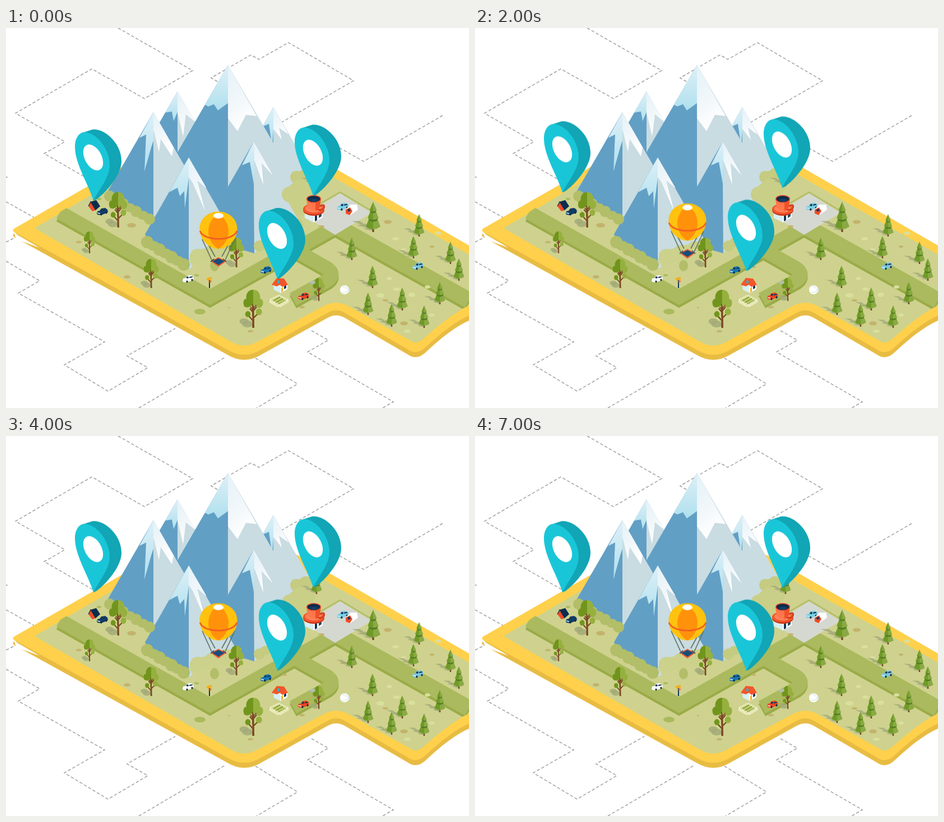
An HTML page for the animation above (8000 ms loop, 826x678 px).

```html
<!DOCTYPE html>
<html lang="en">
<head>
<meta charset="utf-8">
<title>Isometric map</title>
<style>
html, body { margin: 0; width: 100%; height: 100%; overflow: hidden; background: #fff; }
svg { display: block; width: 100%; height: 100%; }
.lift { will-change: transform; }
</style>
</head>
<body>
<svg id="stage" viewBox="0 0 826 678">
  <defs>
    <linearGradient id="iceL" x1="0" y1="0" x2="0" y2="1"><stop offset="0" stop-color="#dff0f7"/><stop offset="1" stop-color="#aee0ee"/></linearGradient>
    <linearGradient id="iceR" x1="0" y1="0" x2=".3" y2="1"><stop offset="0" stop-color="#e3f2f8"/><stop offset=".6" stop-color="#f2f7fa"/><stop offset="1" stop-color="#fff"/></linearGradient>
    <g id="tree">
      <path d="M-2.5 0L-2 -62H2L3 0Z" fill="#7a4a23"/>
      <path d="M0 -18L-14 -34M0 -25L15 -40M0 -40L-9 -51M0 -44L9 -55" stroke="#7a4a23" stroke-width="3.4" fill="none"/>
      <path d="M0 -100C-13 -101 -20 -88 -18 -76C-26 -77 -28 -64 -23 -56C-17 -52 -10 -53 -7 -58L0 -57Z" fill="#71951c"/>
      <path d="M0 -100C13 -101 20 -88 18 -76C26 -77 29 -62 22 -55C16 -50 9 -53 7 -60L0 -57Z" fill="#96b03f"/>
      <ellipse cx="-14" cy="-36" rx="7" ry="8" fill="#71951c"/>
      <ellipse cx="15" cy="-42" rx="8" ry="9" fill="#96b03f"/>
      <path d="M-1.5 -30V-62M0 -45L-7 -56M0 -50L8 -60" stroke="#7a4a23" stroke-width="2.6"/>
    </g>
    <g id="pine">
      <path d="M-4 -4L-30 -10L-22 -14L-52 -22L-40 -25L-70 -36L-44 -36L-30 -27L-24 -28L-8 -14L0 -12Z" fill="#a3aa79" opacity=".85"/>
      <path d="M-3 0V-14H3V0Z" fill="#75471f"/>
      <path d="M0 -100L-12 -72L-8 -72L-18 -46L-13 -46L-24 -18Q-12 -9 0 -9Z" fill="#6f9a27"/>
      <path d="M0 -100L12 -72L8 -72L18 -46L13 -46L24 -18Q12 -9 0 -9Z" fill="#8aa944"/>
      <path d="M-12 -72Q0 -63 12 -72L8 -72L10 -66Q0 -58 -10 -66L-8 -72ZM-18 -46Q0 -35 18 -46L13 -46L15 -39Q0 -29 -15 -39L-13 -46Z" fill="#557f22"/>
    </g>
    <g id="car">
      <path d="M-10 3L-9 -1L-5 -2L-2 -6L5 -7L9 -4L10 0L8 2L-3 6L-9 5Z"/>
      <path d="M-4 -2L-2 -5L1 -4L0 -1ZM2 -2L2 -4L7 -5L8 -3Z" fill="#12365a"/>
      <path d="M-9 2L-4 3" stroke="#dff5fa" stroke-width="1.3"/>
      <ellipse cx="-2" cy="4.6" rx="1.5" ry="2" fill="#17283c"/>
      <ellipse cx="7" cy="1.6" rx="1.5" ry="2" fill="#17283c"/>
    </g>
    <g id="pin">
      <path d="M-20 -121L-3 -126.500C17 -131 50 -104 50 -70C50 -46 22 -14 5 -2L0 0Z" fill="#11a5b5"/>
      <path d="M0 0C-7 -26 -33 -65 -33 -96C-33 -111 -26 -122 -16 -122C5 -122 29 -92 29 -64C29 -41 11 -22 0 0Z" fill="#19c6d8"/>
      <ellipse cx="-.5" cy="-77" rx="15" ry="25" transform="rotate(-28 -.5 -77)" fill="#fff"/>
    </g>
  </defs>
</svg>
<script>
const stage = document.getElementById('stage');
const out = [];
const path = (d, fill, extra = '') => out.push(`<path d="${d}" fill="${fill}" ${extra}/>`);
const poly = (pts, fill) => out.push(`<polygon points="${pts}" fill="${fill}"/>`);
const oval = (x, y, rx, ry, fill, extra = '') =>
  out.push(`<ellipse cx="${x}" cy="${y}" rx="${rx}" ry="${ry}" fill="${fill}" ${extra}/>`);
const line = (d, color, width, extra = '') =>
  path(d, 'none', `stroke="${color}" stroke-width="${width}" ${extra}`);
const use = (id, x, y, scale = 1, extra = '') =>
  out.push(`<use href="#${id}" transform="translate(${x} ${y}) scale(${scale})" ${extra}/>`);

// dashed outlines on the white floor
[
  'M200 0L333 76L247 126L153 73L17 152L105 203L68 224L155 274',
  'M385 100L366 89L437 48L451 56L504 26L620 94L480 175',
  'M779 156L638 238L588 210',
  'M0 265L3 267', 'M0 310L50 338', 'M0 382L22 371',
  'M0 416L60 451L22 473L176 560L104 601L182 648L253 606L216 585L302 536',
  'M237 678L392 587', 'M445 589L520 635L447 678',
  'M545 540L575 557L538 578L691 667L672 678'
].forEach(d => line(d, '#a3a3a3', 1.5, 'stroke-dasharray="5.5 3.500"'));

// board
const rim = 'M16 357L213 244L520 212L826 388V513C796 527 772 548 746 572Q731 584 716 573L606 509Q590 499 574 508L455 574Q425 592 395 574L18 366Q8 361 16 357Z';
path(rim, '#e8bc43', 'transform="translate(0 9)"');
path('M13 360L18 377L60 392Z', '#fff');
path('M13 361L20 369L60 392L60 380Z', '#e8bc43');
path(rim, '#ffd04b');
path('M51 357L213 262L545 244L826 404V495C796 510 770 532 744 555Q731 566 720 557L609 495Q588 485 567 496L450 559Q425 574 400 559Z', '#ced28e');

// roads, with a darker kerb just below
const roads = [
  ['M96 329L364 480L592 352', 25],
  ['M574 345L826 486', 29],
  ['M510 393L572 428Q590 440 572 451L512 484', 25]
];
out.push('<clipPath id="land"><path d="M51 357L300 200H560L826 404V495L790 513L590 490L425 572Z"/></clipPath><g clip-path="url(#land)">');
roads.forEach(([d, w]) => line(d, '#9bab48', w, 'transform="translate(0 5)"'));
roads.forEach(([d, w]) => line(d, '#abba5e', w));
out.push('</g>');

// car park
poly('532,335 596,295 652,330 587,369', '#d5d8d0');
line('M540 325L596 293L650 325', '#b1bd67', 2.5);
oval(527, 325, 9, 8, '#a3aa79');

// stones and pale patches
[[224,352,8,4],[130,382,5,2],[216,444,6,3],[436,541,5,2],[681,346,7,3.5],[563,354,5,2],[710,527,7,3.5],[528,498,5,2],[601,404,5,2],[677,486,5,2],[760,390,4,2],[497,426,4,2]]
  .forEach(p => oval(...p, '#c3b36c'));
[[684,447,5,3],[697,466,6,3],[724,476,6,4],[668,477,7,4],[752,462,5,3],[709,396,5,3],[695,376,6,3],[771,366,6,3],[760,512,5,3],[716,541,6,3]]
  .forEach(p => oval(...p, '#d9df9c'));
[[346,506,10,5],[340,441,4,2],[398,499,2,1],[654,393,6,3],[166,305,4,2]].forEach(p => oval(...p, '#aaba5d'));

// mountains: left face, right face, left snow, right snow
const blue = '#629fc5', pale = '#c8dce2';
function mountain(left, right, snowL, snowR) {
  poly(left, blue);
  poly(right, pale);
  poly(snowL, 'url(#iceL)');
  poly(snowR, 'url(#iceR)');
}
mountain('306,113 250,210 306,250', '306,113 306,250 375,232',
  '306,113 284,151 296,149 299,166 306,150', '306,113 337,167 321,154 316,193 306,151');
mountain('477,141 445,198 477,260', '477,141 477,300 495,292 514,270 541,252',
  '477,141 457,176 469,171 475,211 477,182', '477,141 504,190 487,178 492,199 477,180');
mountain('396,66 300,232 340,360 396,390', '396,66 396,360 440,350 516,272',
  '396,66 355,137 361,140 371,136 378,147 396,134', '396,66 447,157 428,155 413,184 396,161');
mountain('263,150 180,294 200,310 263,344', '263,150 263,344 330,380 364,325',
  '263,150 238,196 250,190 247,256 259,213 263,201', '263,150 299,213 296,229 276,198 273,221 263,181');
mountain('442,203 384,304 384,385 443,402', '442,203 443,402 468,378 523,345',
  '442,203 421,245 435,239 442,278 443,236', '442,203 476,263 456,241 459,279 443,236');
mountain('326,231 248,368 258,388 326,430', '326,231 326,430 414,386',
  '326,231 291,293 306,285 310,300 318,291 319,322 326,268', '326,231 358,286 341,272 355,326 333,276 326,266');

// shrubs along the foot of the mountains
function hedge(x0, y0, x1, y1, r, n, color) {
  for (let i = 0; i <= n; i++) {
    const k = i / n;
    oval(x0 + (x1 - x0) * k, y0 + (y1 - y0) * k, r, r * (i % 2 ? .8 : 1), color);
  }
}
hedge(185, 300, 256, 341, 10, 6, '#b2be68');
hedge(252, 382, 317, 422, 11, 6, '#b2be68');
poly('326,412 345,398 420,378 420,410 340,440', '#ced28e');
hedge(342, 408, 405, 391, 14, 5, '#ccd18b');
hedge(452, 389, 520, 350, 10, 6, '#c5cb80');
oval(372, 424, 8, 10, '#b2be68');
hedge(518, 266, 543, 259, 11, 3, '#c5cb80');
hedge(506, 297, 528, 283, 14, 2, '#c9ce87');
poly('494,292 520,270 560,270 532,334 519,338', '#cacf88');

// trees: x, foot, height
const shadow = (x, y, s) => {
  oval(x - 15 * s, y - 10 * s, 14 * s, 9 * s, '#a3aa79', 'opacity=".85"');
  oval(x - 24 * s, y - 17 * s, 12 * s, 8 * s, '#a3aa79', 'opacity=".85"');
};
[[200,356,63],[149,402,39],[259,464,52],[411,427,53],[441,535,68],[558,487,41]].forEach(([x, y, h]) => {
  const s = h / 100;
  shadow(x, y, s);
  use('tree', x, y, s);
});
[[554,282,40],[655,364,54],[737,372,40],[727,411,40],[793,421,40],[808,451,40],[617,414,40],[654,464,40],[774,493,40],[707,504,41],[646,512,40],[688,533,41],[746,535,40]]
  .forEach(([x, y, h]) => use('pine', x, y, h / 100));

// cars
use('car', 172, 328, 1, 'fill="#123d66"');
use('car', 325, 448, 1, 'fill="#fff"');
use('car', 464, 432, 1, 'fill="#1b78b4"');
use('car', 531, 479, 1, 'fill="#ee4423"');
use('car', 735, 425, 1, 'fill="#7cc6db"');
use('car', 601, 319, 1.05, 'fill="#79cfe4"');
poly('606,323 615,315 626,315 628,324 614,334 606,331', '#fff');
poly('606,324 614,320 618,327 613,334 606,331', '#ee4d2a');
poly('609,324 613,322 615,326 610,328', '#17375a');

// tent
poly('147,318 151,310 160,325 154,327', '#ef4b27');
poly('151,310 161,307 168,318 160,325', '#0d2d4d');
line('M147 318L151 310L160 325', '#0d2d4d', 1.2);

// signpost
line('M363 445V464', '#17375a', 2);
path('M357 447L366 444L368 448L360 451Z', '#f7ae1b');
path('M360 453L367 450L366 454Z', '#e9682b');

// round white animal
oval(604, 467, 8, 8, '#fff');
oval(611, 468, 2, 4, '#e5edf0');
line('M600 462Q606 459 608 465M600 471Q605 474 609 469', '#ccd9dd', 1);
oval(547, 454, 5, 3, '#aebfae');

// cottage and garden
poly('477,457 483,452 490,460 490,473 478,467', '#d7f0f7');
poly('489,461 502,455 502,466 490,473', '#fff');
poly('474,458 483,446 496,447 503,458 493,462 489,458 483,461', '#f5552b');
poly('491,464 494,462 494,470 491,472', '#f8ae1c');
poly('496,461 500,459 500,464 496,466', '#14375b');
oval(486, 453, 2, 3, '#16b7cc');
poly('470,487 488,477 505,487 487,497', '#c5d078');
line('M477 487L489 480M481 490L494 483M485 493L499 486', '#879e38', 2);
line('M471 487L487 496L504 486', '#fffbe0', 6, 'stroke-dasharray="1.6 1.1"');
line('M471 485L487 477L504 486', '#fffbe0', 3, 'stroke-dasharray="1.5 1.5"');

// cafe under a giant cup
poly('533,326 549,331 549,347 533,339', '#d8eff5');
poly('549,331 565,326 565,338 549,347', '#fff');
poly('551,335 555,333 555,343 551,345', '#173553');
poly('558,332 563,329 563,336 558,339', '#2e4961');
oval(549, 325, 19, 10, '#c93417');
oval(549, 323, 19, 9.5, '#f2572f');
oval(549, 322, 15, 7, '#ff8259');
line('M559 318Q570 313 567 321Q562 327 555 323', '#d63d1d', 3);
path('M536 305L538 320Q548 331 559 321L562 305Z', '#ff774b');
path('M552 309L552 327L559 321L562 305Z', '#ee5129');
oval(549, 305, 13, 7, '#ef4b27');
oval(549, 305, 11.5, 5.6, '#0c2c4b');
path('M541 307Q549 302 558 307Q549 313 541 307Z', '#163f65');

// hot-air balloon
out.push('<g class="lift">');
line('M350 377L367 414M361 386L373 408M397 386L385 408M408 377L391 414', '#627162', 1.7);
path('M345.500 359C345 341 360 327.500 379 327.500S413 341 412.500 359C412 381 393 394 379 394S346 381 345.500 359Z', '#ffc20e');
path('M379 333C368 337 361 350 361 363C361 378 371 390 379 394C387 390 397 378 397 363C397 350 390 337 379 333Z', '#ff920a');
oval(379, 335, 9, 5, '#fff');
line('M346 362C352 381 406 381 412 362', '#f35a24', 2.6);
poly('365,416 379,409 393,416 379,426', '#f0592b');
poly('368,416 379,411 390,416 379,423', '#174d7d');
line('M371 412L365 417M387 412L393 417', '#163b5c', 1.4);
out.push('</g>');

// pins
[[156, 308], [548, 299.5], [484, 448]].forEach(([x, y]) => {
  out.push('<g class="lift">');
  use('pin', x, y);
  out.push('</g>');
});

stage.insertAdjacentHTML('beforeend', out.join(''));

// stepped rise and fall, one level per second
const levels = [0, 1, 2, 3, 4, 5, 5, 4];
const rise = 7.3;
const steps = levels.map((n, i) => ({
  offset: i / levels.length,
  transform: `translateY(${-n * rise}px)`,
  easing: 'steps(1, end)'
}));
steps.push({ offset: 1, transform: steps[steps.length - 1].transform });
document.querySelectorAll('.lift').forEach(el =>
  el.animate(steps, { duration: levels.length * 1000, iterations: Infinity }));
</script>
</body>
</html>
```
